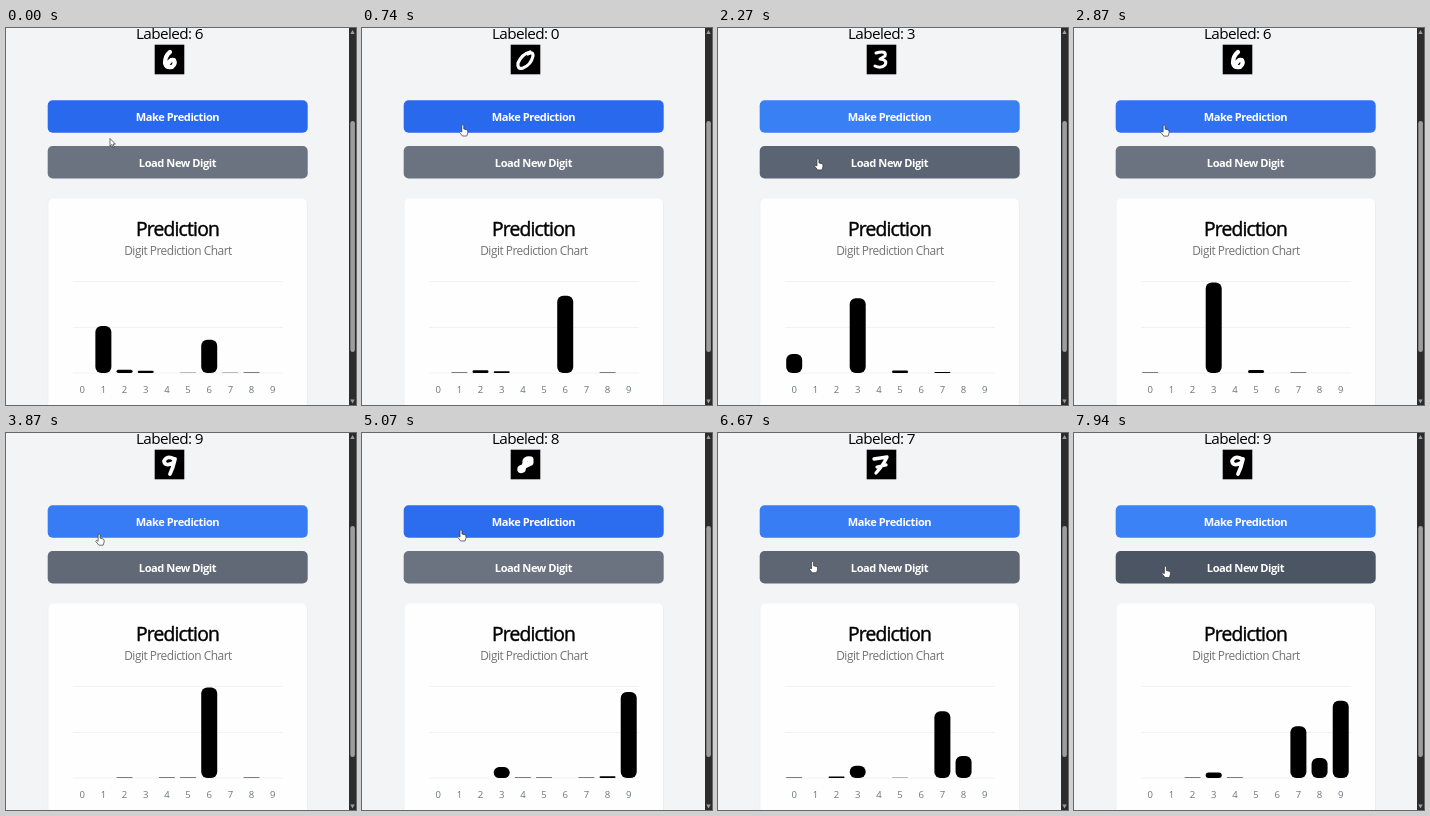
Recreate the animation shown at these times as an HTML page. Size 350 by 377 pixels, loop 8 s.

```html
<!DOCTYPE html>
<html lang="en">
<head>
<meta charset="utf-8">
<title>Digit prediction</title>
<style>
  html, body { margin: 0; width: 100%; height: 100%; overflow: hidden; background: #f3f4f6; }
  svg { display: block; width: 350px; height: 377px; }
  text { font-family: "Open Sans", "Noto Sans", sans-serif; letter-spacing: -.04em; text-anchor: middle; }
  .button { font-size: 11.1px; font-weight: 700; fill: #fff; }
  .tick { font-size: 9.5px; fill: #6b7280; letter-spacing: 0; }
  .pointer { fill: #fff; stroke: #333; stroke-width: .7; stroke-linejoin: round; }
</style>
</head>
<body>
<svg viewBox="0 0 350 377">
  <rect width="350" height="377" fill="#f3f4f6"/>
  <text id="label" x="163.5" y="11" font-size="15.3"></text>
  <rect x="148.7" y="16.7" width="29.6" height="29.6"/>
  <path id="digit" transform="translate(149 17)" fill="none" stroke="#fff" stroke-linecap="round" stroke-linejoin="round"/>

  <rect id="make" x="41.7" y="72.3" width="260" height="32.4" rx="5"/>
  <text class="button" x="171.5" y="93">Make Prediction</text>
  <rect id="load" x="41.7" y="118" width="260" height="32.4" rx="5"/>
  <text class="button" x="171.5" y="138.5">Load New Digit</text>

  <rect x="41.7" y="171" width="260" height="220" rx="5.5" fill="#e8eaed"/>
  <rect x="42.3" y="170.5" width="258.7" height="220" rx="5" fill="#fefefe"/>
  <text x="171.5" y="207.5" font-size="19.3" stroke="#000" stroke-width=".4">Prediction</text>
  <text x="172" y="227" font-size="11.9" fill="#737373">Digit Prediction Chart</text>
  <path d="M67 253.5H277M67 299.5H277M67 345H277" stroke="#f2f2f2"/>
  <g id="chart"></g>

  <rect x="343" width="7" height="377" fill="#2c2c2c"/>
  <rect x="344.3" y="93" width="4.6" height="231" rx="2.3" fill="#9d9d9d"/>
  <path d="M344.3 6L346.5 2L348.7 6ZM344.3 371.5L346.5 375.5L348.7 371.5Z" fill="#9d9d9d"/>

  <g id="cursor">
    <path id="arrow" class="pointer" d="M0 0V7.6L1.8 6L3 8.8L4.2 8.3L3 5.6H5.4Z"/>
    <path id="hand" class="pointer" d="M-1 .6Q0 -1 1 .6V4L4 4.8Q5.4 5.4 5 7.8L4 11H-.3L-3.4 7.2Q-3.4 5.6 -1 7Z"/>
  </g>
</svg>
<script>
const LOOP = 8000, GROW = 380, FADE = 140, LOAD_DELAY = 490, BASE = 345, RANGE = 91;
const $ = id => document.getElementById(id);

// Handwriting: pen width and path
const glyphs = {
  0: [3.2, 'M19 7Q11 9 7 18Q6 25 12 23Q20 20 22 11Q22 6 17 9'],
  1: [3, 'M14 6V23'],
  3: [3, 'M9 8Q20 5 18 11L13 14Q21 15 18 20Q14 24 8 21'],
  6: [4.2, 'M15 7Q10 11 10 18Q11 23 17 22Q21 19 19 15Q15 14 13 19'],
  7: [3.3, 'M7 9L20 7Q17 14 9 23M10 17L19 15'],
  8: [5, 'M20 9Q13 8 14 13L12 20Q8 22 9 18Q14 16 20 13Z'],
  9: [3.8, 'M19 9Q12 5 9 11Q10 17 18 13L20 9Q18 18 15 24']
};

// Each round predicts the shown digit, then loads the next one.
// odds: bar heights; faint: digits with a hairline bar
const rounds = [
  {at: -1100, digit: 1, odds: {1: .9, 2: .04, 3: .03}, faint: '578'},
  {at: -78, digit: 6, odds: {2: .03, 3: .02, 6: .85}, faint: '18'},
  {at: 960, digit: 0, odds: {0: .967, 3: .176, 7: .035}, faint: '5'},
  {at: 2090, digit: 3, odds: {3: .995, 5: .033}, faint: '07'},
  {at: 3140, digit: 6, odds: {6: .995}, faint: '2458'},
  {at: 4270, digit: 9, odds: {3: .12, 8: .02, 9: .945}, faint: '457'},
  {at: 5430, digit: 8, odds: {3: .3, 7: .06, 8: .9}, faint: '02'},
  {at: 6505, digit: 7, odds: {2: .02, 3: .08, 7: .96, 8: .02}, faint: '05'},
  {at: 7450, digit: 9, odds: {3: .06, 7: .57, 8: .22, 9: .85}, faint: '24'}
];

const mix = (a, b, u) => a + (b - a) * u;
const roundAt = t => rounds.findLastIndex(r => r.at <= t);
const share = ({odds, faint}, i) => odds[i] || (faint.includes(i) ? .005 : 0);

// Resting places of the pointer on the two buttons, drifting from round to round
const makeSpot = k => [97 + 7 * Math.cos(k - 1), 97];
const loadSpot = k => [105.8 - 1.8 * k, 133.5];

function glide(from, to, u) {
  u = Math.min(1, Math.max(0, u));
  const s = u * u * (3 - 2 * u);
  return from.map((v, i) => mix(v, to[i], s));
}

function pointer(t) {
  // The pointer leaves just before the prediction starts.
  const k = roundAt(t + 20), age = t + 20 - rounds[k].at;
  return age < LOAD_DELAY
    ? glide(makeSpot(k), loadSpot(k), age / 240)
    : glide(loadSpot(k), makeSpot(k + 1), (age - LOAD_DELAY - 40) / 280);
}

const overMake = y => y > 72.3 && y < 104.7;
const overLoad = y => y > 118 && y < 150.4;

// A linear colour fade equals the hovered share of the last FADE ms.
function hover(t, over) {
  let n = 0;
  for (let i = 0; i < 20; i++) n += over(pointer(t - i / 20 * FADE)[1]);
  return n / 20;
}

const blend = (a, b, u) => `rgb(${a.map((v, i) => Math.round(mix(v, b[i], u)))})`;

function set(node, attrs) {
  for (const key in attrs) node.setAttribute(key, attrs[key]);
  return node;
}

function add(tag, attrs) {
  const node = document.createElementNS('http://www.w3.org/2000/svg', tag);
  return $('chart').appendChild(set(node, attrs));
}

const bars = Array.from({length: 10}, (_, i) => {
  const x = 76.2 + 21.17 * i;
  add('text', {class: 'tick', x, y: 365}).textContent = i;
  return add('rect', {x: x - 8, width: 16});
});

function draw(t) {
  const k = roundAt(t), age = t - rounds[k].at;
  const {digit} = rounds[age < LOAD_DELAY ? k : k + 1] || rounds[k];
  const [pen, path] = glyphs[digit];
  $('label').textContent = 'Labeled: ' + digit;
  set($('digit'), {d: path, 'stroke-width': pen});

  const grown = 1 - (1 - Math.min(1, age / GROW)) ** 2.4;
  bars.forEach((bar, i) => {
    const height = RANGE * mix(share(rounds[k - 1], i), share(rounds[k], i), grown);
    set(bar, {y: BASE - height, height, rx: Math.min(6, height / 2)});
  });

  set($('make'), {fill: blend([59, 130, 246], [37, 99, 235], hover(t, overMake))});
  set($('load'), {fill: blend([107, 114, 128], [75, 85, 99], hover(t, overLoad))});

  const [x, y] = pointer(t), onButton = overMake(y) || overLoad(y);
  set($('cursor'), {transform: `translate(${x} ${y})`});
  set($('hand'), {display: onButton ? 'inline' : 'none'});
  set($('arrow'), {display: onButton ? 'none' : 'inline'});
}

const begin = performance.now();
function frame() {
  draw((performance.now() - begin) % LOOP);
  requestAnimationFrame(frame);
}
frame();
</script>
</body>
</html>
```
